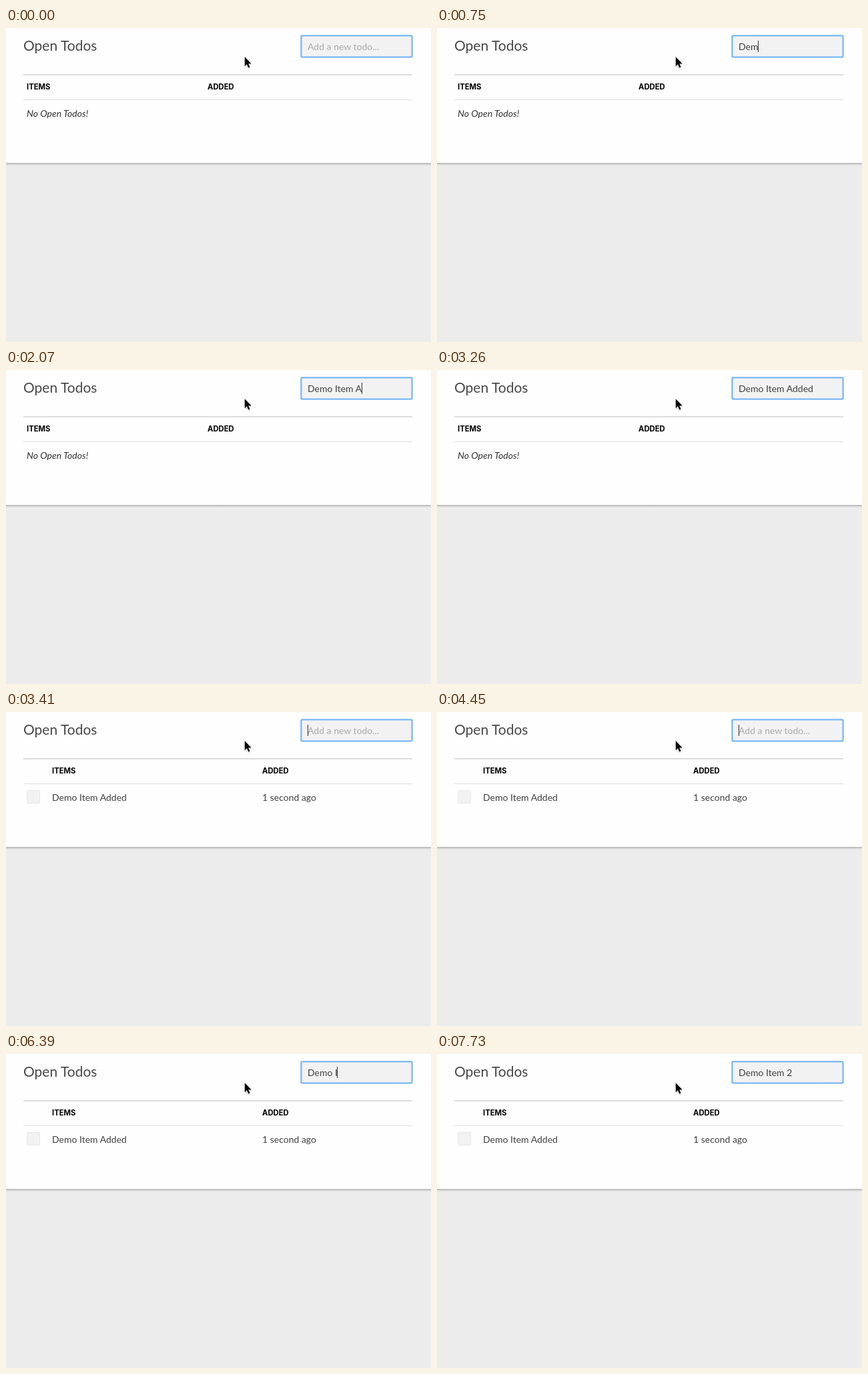
Animation, 637 px wide and 470 px high, one loop 8000 ms. Source, as an HTML page:

```html
<!DOCTYPE html>
<html lang="en">
<head>
<meta charset="utf-8">
<title>Open Todos</title>
<style>
  html, body { margin: 0; width: 100%; height: 100%; overflow: hidden; background: #ececec; }
  svg { display: block; }
  text { font: 14px Lato, sans-serif; fill: #404040; white-space: pre; }
  .title { font-size: 21px; fill: #484848; }
  .head { font: 700 11.3px Inter, sans-serif; fill: #000; }
  .hint { fill: #aaa; }
  .empty { font-style: italic; fill: #333; }
</style>
</head>
<body>
<svg width="637" height="470" viewBox="0 0 637 470">
  <defs>
    <linearGradient id="shade" x2="0" y2="1">
      <stop stop-color="#aaa"/>
      <stop offset=".5" stop-color="#d4d4d4"/>
      <stop offset="1" stop-color="#ececec"/>
    </linearGradient>
    <filter id="soft" x="-50%" y="-50%" width="200%" height="200%"><feGaussianBlur stdDeviation="1"/></filter>
    <path id="arrow" d="M357.8 43.2v14l3.2-3 2.3 5.3 2.3-1-2.3-5h4.5z"/>
  </defs>
  <rect width="637" height="202" fill="#fefefe"/>
  <rect y="202" width="637" height="4" fill="url(#shade)"/>

  <text class="title" x="26" y="34">Open Todos</text>
  <rect x="441" y="10" width="169" height="35" rx="3" fill="#b5d8fb"/>
  <rect x="441.7" y="10.7" width="167.6" height="33.6" rx="2.5" fill="#74b5f6"/>
  <rect x="443.5" y="12.5" width="164" height="30" rx="1" fill="#f2f2f2"/>
  <text class="hint" id="hint" x="452" y="33">Add a new todo...</text>
  <text id="typed" x="452" y="33"></text>
  <rect id="caret" y="19" width="1" height="17" fill="#333"/>

  <path d="M26 69h583v2H26zM26 107h583v1H26z" fill="#ddd"/>
  <g id="before">
    <text class="head" x="31" y="92">ITEMS</text>
    <text class="head" x="302" y="92">ADDED</text>
    <text class="empty" x="31" y="133">No Open Todos!</text>
  </g>
  <g id="after">
    <text class="head" x="69" y="92">ITEMS</text>
    <text class="head" x="384" y="92">ADDED</text>
    <rect x="31.5" y="117.5" width="19" height="19" rx="1" fill="#f2f2f2" stroke="#e6e6e6"/>
    <text x="69" y="133">Demo Item Added</text>
    <text x="384" y="133">1 second ago</text>
  </g>

  <use href="#arrow" y="1.5" opacity=".4" filter="url(#soft)"/>
  <use href="#arrow" stroke="#fff" stroke-width="1.6"/>
  <use href="#arrow"/>
</svg>
<script>
const LOOP = 8000, ADDED_AT = 3410;
const FIRST = "Demo Item Added", SECOND = "Demo Item 2";

// [start ms, text, letters shown, caret visible]
const steps = [[0, "", 0, 0]];
[300, 600, 750, 890, 1040, 1340, 1490, 1630, 1780, 1930, 2070, 2370, 2520, 2660, 2810]
  .forEach((t, i) => steps.push([t, FIRST, i + 1, 1]));
steps.push(
  [3260, FIRST, 15, 0],
  [ADDED_AT, "", 0, 1], [3850, "", 0, 0], [4450, "", 0, 1],
  [4750, SECOND, 1, 1], [5050, SECOND, 2, 1], [5190, SECOND, 3, 1],
  [5490, SECOND, 4, 1], [5790, SECOND, 5, 1], [6240, SECOND, 5, 0],
  [6390, SECOND, 6, 1], [6680, SECOND, 8, 1], [6830, SECOND, 9, 1],
  [7130, SECOND, 10, 1], [7280, SECOND, 11, 1], [7730, SECOND, 11, 0]
);

const el = id => document.getElementById(id);
const show = (id, on) => el(id).setAttribute("visibility", on ? "visible" : "hidden");
const pen = document.createElement("canvas").getContext("2d");
pen.font = "14px Lato, sans-serif";

function draw(t) {
  const [, text, count, caret] = steps.findLast(s => s[0] <= t);
  const value = text.slice(0, count);
  el("typed").textContent = value;
  el("caret").setAttribute("x", 452 + Math.floor(pen.measureText(value).width));
  show("caret", caret);
  show("hint", !value);
  show("before", t < ADDED_AT);
  show("after", t >= ADDED_AT);
}

let start;
function tick(now) {
  start ??= now;
  draw((now - start) % LOOP);
  requestAnimationFrame(tick);
}
draw(0);
requestAnimationFrame(tick);
</script>
</body>
</html>
```
